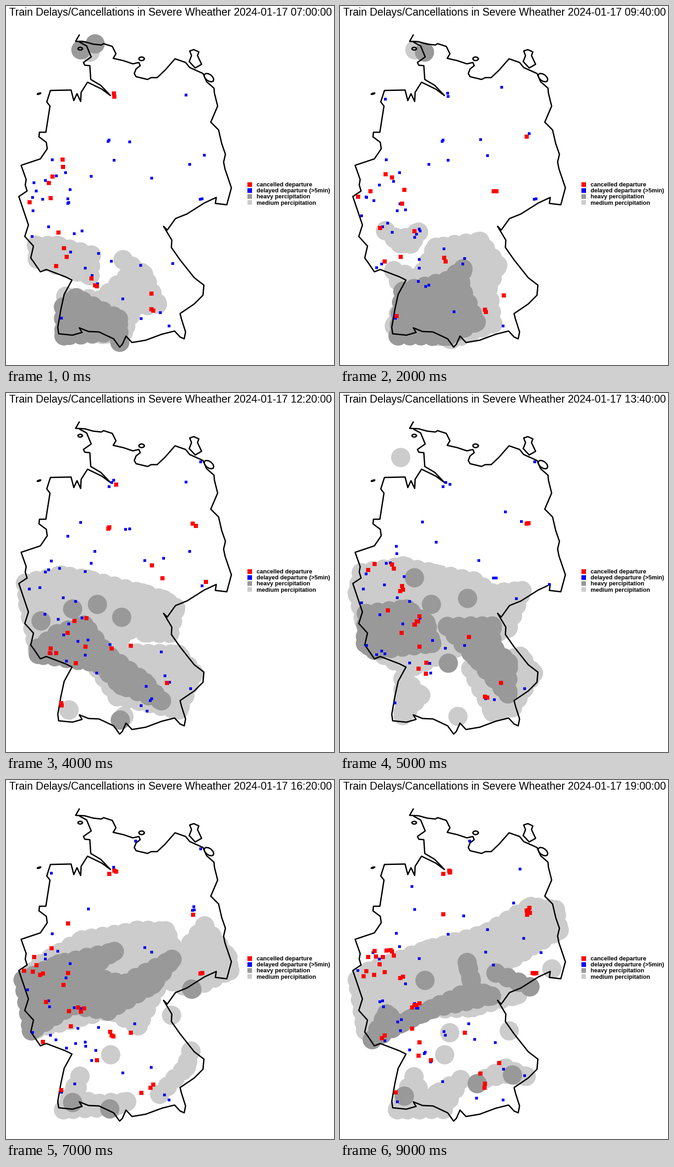
These frames come from a looping animation (716x782 px, 10 s). A matplotlib script:

```python
import numpy as np
import matplotlib.pyplot as plt
from matplotlib.animation import FuncAnimation
from matplotlib.collections import PolyCollection
from matplotlib.path import Path

W, H, DPI = 716, 782, 100
PX = 72 / DPI
STEPS = 10
HEAVY, MEDIUM, RED, BLUE = "#999999", "#cccccc", "#ff0000", "#0000ff"
RADIUS, SPACING = 21, 25


def pts(*v):
    return np.array(v, float).reshape(-1, 2)


def ring(cx, cy, rx, ry, tilt=0.0):
    t = np.linspace(0, 2 * np.pi, 13)
    x, y = rx * np.cos(t), ry * np.sin(t)
    c, s = np.cos(tilt), np.sin(tilt)
    return np.column_stack([cx + c * x - s * y, cy + s * x + c * y])


# ---- borders ----
north = pts(
    160, 63, 152, 77, 172, 78, 190, 83, 208, 85, 213, 82, 232, 88, 240, 104,
    234, 114, 256, 119, 277, 126, 290, 123, 293, 130, 284, 137, 280, 147,
    284, 154, 309, 160, 317, 156, 330, 156, 347, 140, 369, 115, 392, 123,
    401, 134, 430, 147, 438, 165, 454, 179)
east = pts(
    454, 179, 455, 190, 462, 218, 447, 253, 464, 270, 471, 300, 479, 323,
    475, 340, 478, 355, 492, 396, 482, 433, 457, 430, 459, 417, 433, 429,
    395, 453, 370, 463, 352, 488, 344, 480, 362, 510, 361, 526, 380, 553,
    411, 592, 432, 608, 430, 630, 411, 649, 380, 670)
south = pts(
    380, 670, 383, 682, 392, 710, 389, 725, 380, 721, 368, 708, 340, 715,
    305, 728, 275, 733, 262, 719, 254, 737, 248, 743, 235, 725, 203, 710,
    180, 709, 160, 701, 166, 711, 145, 717, 115, 714, 113, 700, 120, 660,
    127, 628, 144, 597, 130, 590, 88, 574, 75, 579, 60, 557)
west = pts(
    60, 557, 54, 549, 60, 523, 41, 502, 49, 477, 28, 415, 46, 403, 42, 390,
    44, 378, 33, 347, 75, 333, 90, 311, 88, 297, 72, 285, 73, 275, 87, 275,
    96, 218, 89, 209, 97, 184, 142, 183, 148, 206, 155, 191, 163, 208,
    164, 188, 178, 166, 209, 181, 228, 195, 207, 173, 185, 160, 183, 130,
    172, 129, 169, 123, 186, 111, 176, 87, 161, 79)
border = np.vstack([north, east, south, west])
islands = [
    pts(400, 121, 405, 108, 401, 98, 410, 95, 421, 100, 418, 108, 427, 127,
        413, 135, 400, 121),
    ring(443, 156, 12, 7, 0.65), ring(296, 115, 6, 4), ring(162, 93, 5, 3),
    ring(72, 191, 4, 1, -0.3)]

# ---- weather: outlines at key steps, blended in between ----
medium_fronts = [
    {0: pts(66, 521, 111, 521, 186, 542, 183, 587, 68, 551),
     2: pts(99, 489, 130, 510, 171, 492, 154, 518, 130, 517),
     4: pts(42, 414, 120, 396, 178, 405, 297, 435, 343, 449, 370, 467,
            357, 523, 303, 522, 283, 505, 215, 560, 70, 568, 47, 460),
     5: pts(46, 391, 137, 376, 208, 393, 292, 409, 330, 435, 397, 430,
            366, 512, 240, 560, 150, 600, 75, 560, 52, 497, 37, 435),
     6: pts(46, 390, 179, 349, 241, 351, 303, 385, 362, 372, 440, 418,
            390, 467, 340, 450, 366, 512, 305, 495, 257, 577, 193, 573,
            55, 545, 37, 435),
     7: pts(75, 400, 165, 348, 288, 327, 348, 328, 375, 390, 433, 317,
            484, 386, 488, 415, 405, 455, 340, 430, 288, 535, 225, 500,
            55, 545, 37, 435),
     9: pts(62, 416, 192, 368, 315, 335, 416, 275, 470, 282, 478, 327,
            419, 361, 345, 410, 388, 467, 290, 495, 185, 500, 55, 545,
            37, 435)},
    {0: pts(130, 632, 205, 640, 275, 580, 255, 552, 300, 584, 330, 649,
            278, 655, 256, 710, 210, 715),
     2: pts(117, 576, 172, 594, 209, 525, 305, 512, 344, 564, 323, 612,
            333, 692, 243, 726, 118, 697, 140, 630),
     4: pts(200, 600, 243, 565, 375, 568, 410, 610, 377, 690, 242, 661),
     5: pts(285, 600, 393, 573, 422, 610, 376, 685, 333, 695),
     6: pts(321, 583, 375, 560, 428, 629, 407, 645, 313, 607),
     7: pts(403, 590, 393, 625, 335, 684, 393, 625),
     9: pts(317, 650, 361, 627, 406, 645, 361, 640)},
    {4: pts(137, 690),
     5: pts(137, 622, 176, 658, 137, 702),
     6: pts(146, 682),
     7: pts(161, 645, 150, 690, 195, 705, 263, 700, 235, 712, 125, 718),
     9: pts(161, 646, 183, 703, 210, 683, 263, 652, 225, 717, 125, 718)}]
heavy_fronts = [
    {0: pts(125, 655, 152, 635, 190, 654, 245, 681, 246, 710, 126, 718),
     2: pts(137, 621, 233, 598, 268, 572, 262, 610, 297, 688, 235, 719,
            126, 718),
     4: pts(70, 555, 111, 524, 170, 505, 221, 570, 303, 630, 339, 670,
            252, 637, 200, 588, 70, 569),
     5: pts(57, 480, 145, 470, 187, 500, 200, 545, 75, 560, 55, 545),
     6: pts(37, 435, 76, 440, 115, 500, 150, 435, 225, 450, 250, 495,
            186, 552, 150, 510, 70, 528),
     7: pts(37, 435, 115, 400, 236, 373, 165, 420, 255, 445, 362, 390,
            320, 445, 222, 503, 145, 490, 55, 546),
     9: pts(70, 565, 101, 509, 130, 531, 200, 498, 290, 455, 277, 397,
            290, 455, 330, 470, 200, 498, 130, 531)},
    {5: pts(234, 508, 332, 507, 330, 550, 367, 587, 366, 655, 295, 575),
     6: pts(394, 572, 398, 601),
     7: pts(405, 455),
     9: pts(340, 420, 414, 450)}]

# Single cells: x, y, first step, last step
medium_cells = [(183, 100, 0, 1), (163, 95, 2, 2), (257, 704, 4, 6),
                (132, 140, 5, 5), (228, 598, 7, 9), (361, 512, 7, 7),
                (239, 550, 9, 9), (369, 546, 9, 9), (462, 411, 9, 9)]
heavy_cells = [(194, 82, 0, 1), (163, 95, 0, 1), (248, 732, 0, 0),
               (184, 100, 2, 2), (76, 496, 4, 4), (145, 470, 4, 4),
               (199, 460, 4, 5), (252, 488, 4, 4), (249, 712, 4, 4),
               (162, 402, 5, 5), (278, 447, 5, 6), (236, 588, 5, 5),
               (135, 398, 6, 6), (191, 387, 6, 6), (240, 411, 6, 6),
               (291, 408, 6, 6), (338, 507, 6, 6), (145, 702, 7, 7),
               (226, 716, 7, 8), (140, 688, 8, 9), (299, 661, 9, 9),
               (376, 642, 9, 9), (185, 436, 9, 9)]


def lengths(shape):
    loop = np.vstack([shape, shape[:1]])
    steps = np.hypot(*np.diff(loop, axis=0).T)
    return loop, np.append(0, np.cumsum(steps))


def resample(shape, n):
    """n points evenly spaced along a closed outline."""
    loop, run = lengths(shape)
    u = np.linspace(0, run[-1], n, endpoint=False)
    return np.column_stack([np.interp(u, run, c) for c in loop.T])


def outline(keys, k):
    if k in keys:
        return keys[k]
    a = max((i for i in keys if i < k), default=None)
    b = min((i for i in keys if i > k), default=None)
    if a is None or b is None:
        return None
    f = (k - a) / (b - a)
    return (1 - f) * resample(keys[a], 24) + f * resample(keys[b], 24)


def weather(fronts, cells, k):
    """Filled outlines and the disc centres along their rims."""
    shapes = [s for s in (outline(f, k) for f in fronts) if s is not None]
    rims = [pts(*(v for x, y, a, b in cells if a <= k <= b for v in (x, y)))]
    for s in shapes:
        n = max(1, round(lengths(s)[1][-1] / SPACING))
        rims += [s, resample(s, n)]
    return [s for s in shapes if len(s) > 2], np.vstack(rims)


# ---- stations: dense hubs (x, y, spread, count) and a loose rural net ----
hubs = [(80, 385, 10, 9), (107, 372, 9, 5), (83, 420, 8, 7), (52, 425, 10, 4),
        (168, 496, 7, 10), (150, 505, 14, 5), (91, 565, 8, 7),
        (165, 545, 16, 5), (168, 590, 14, 6), (198, 607, 7, 5),
        (317, 666, 4, 6), (305, 640, 20, 4), (408, 285, 5, 6),
        (234, 199, 5, 8), (336, 387, 10, 3), (427, 411, 7, 4),
        (287, 548, 8, 3), (126, 676, 5, 4), (225, 296, 3, 2),
        (140, 435, 22, 7), (130, 345, 16, 4), (235, 555, 18, 3),
        (100, 480, 12, 4), (360, 625, 16, 3)]
rng = np.random.default_rng(17)
city = np.vstack([rng.normal((x, y), spread, (n, 2))
                  for x, y, spread, n in hubs])
land = Path(border)
rural = rng.uniform((30, 80), (490, 730), (110, 2))
city = city[land.contains_points(city)]
rural = rural[land.contains_points(rural)]
stations = np.vstack([city, rural])
odds = np.append(np.full(len(city), 1.5), np.ones(len(rural)))
odds /= odds.sum()


def departures(k):
    """Delays stay level, cancellations pile up towards the evening."""
    r = np.random.default_rng(100 + k)
    late = k / (STEPS - 1)
    delayed = r.choice(stations, 46 + round(12 * late), replace=False, p=odds)
    cancelled = r.choice(city, 18 + round(26 * late ** 2.5), replace=False)
    return delayed, cancelled


# ---- stage ----
fig = plt.figure(figsize=(W / DPI, H / DPI), dpi=DPI, facecolor="white")
ax = fig.add_axes([0, 0, 1, 1])
ax.set_xlim(0, W)
ax.set_ylim(H, 0)
ax.axis("off")


def marks(shape, px, color, z):
    return ax.scatter([], [], s=(px * PX) ** 2, marker=shape, color=color,
                      linewidths=0, zorder=z)


def cloud(color, z):
    body = PolyCollection([], facecolors=color, edgecolors="none", zorder=z)
    ax.add_collection(body, autolim=False)
    return body, marks("o", 2 * RADIUS, color, z)


layers = [(*cloud(MEDIUM, 1), medium_fronts, medium_cells),
          (*cloud(HEAVY, 2), heavy_fronts, heavy_cells)]
dots = marks("s", 6, BLUE, 4), marks("s", 9, RED, 5)

for line in [border, *islands]:
    ax.plot(*line.T, color="black", lw=2.9 * PX, zorder=3,
            solid_joinstyle="round", solid_capstyle="round")

legend = [(RED, "cancelled departure"), (BLUE, "delayed departure (>5min)"),
          (HEAVY, "heavy percipitation"), (MEDIUM, "medium percipitation")]
for i, (color, label) in enumerate(legend):
    y = 388.5 + 13.1 * i
    marks("s", 10, color, 6).set_offsets([[532, y]])
    ax.text(547, y + 4.7, label, family="Liberation Sans", weight="bold",
            size=12.95 * PX, va="baseline")

title = ax.text(359, 21.5, "", family="Liberation Sans", size=23.15 * PX,
                ha="center", va="baseline")


def update(k):
    for body, rim, fronts, cells in layers:
        shapes, centres = weather(fronts, cells, k)
        body.set_verts(shapes)
        rim.set_offsets(centres)
    for mark, places in zip(dots, departures(k)):
        mark.set_offsets(places)
    hour, minute = divmod(7 * 60 + 80 * k, 60)
    title.set_text("Train Delays/Cancellations in Severe Wheather "
                   f"2024-01-17 {hour:02d}:{minute:02d}:00")
    return []


anim = FuncAnimation(fig, update, frames=STEPS, interval=1000, repeat=True,
                     repeat_delay=0, blit=False)
plt.show()
```
